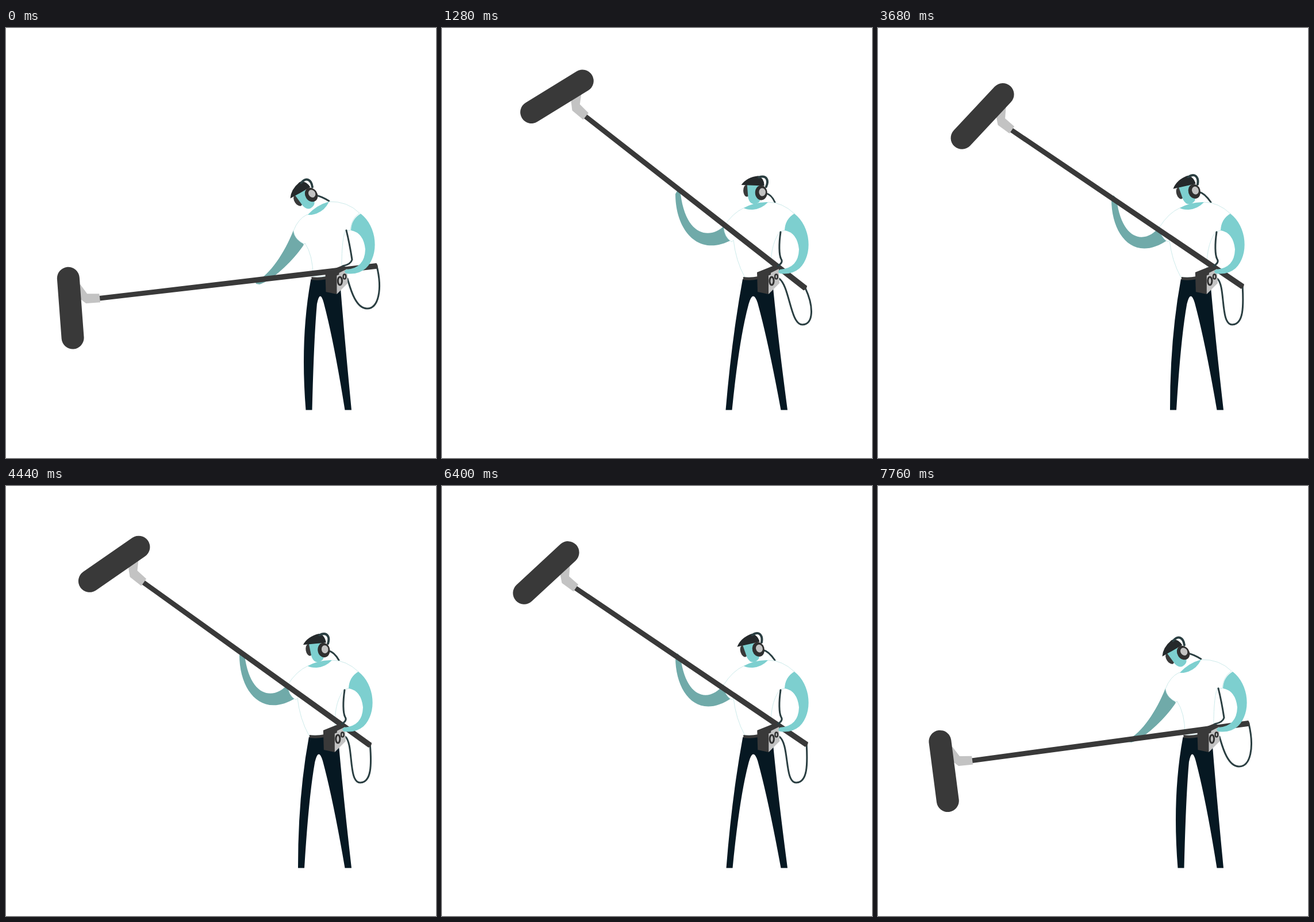
Recreate the animation shown at these times as an HTML page. Size 748 by 748 pixels, loop 7800 ms.

```html
<!DOCTYPE html>
<html lang="en">
<head>
<meta charset="utf-8">
<title>Boom operator</title>
<style>
  html, body { margin: 0; width: 100%; height: 100%; overflow: hidden; background: #fff; }
  svg { display: block; width: 100%; height: 100%; }
  .skin { fill: #7dcfcf; }
  .shade { fill: #70aaa9; }
  .dark { fill: #393939; }
  .grey { fill: #c3c3c3; }
  .wire { fill: none; stroke: #2b3f42; stroke-width: 3; stroke-linecap: round; stroke-linejoin: round; }
  #shirt { fill: #fff; stroke: #bfe5e5; stroke-width: .8; }
  #pants { fill: #061822; }
</style>
</head>
<body>
<svg viewBox="0 0 748 748">
  <path id="backArm" class="shade"/>
  <path id="headWire" class="wire"/>
  <g id="head">
    <ellipse class="dark" cx="-25" cy="-4.5" rx="6" ry="10.5"/>
    <path class="skin" d="M-24,-17 L-4,-17 L-2,12 Q-4,19 -14,19 Q-21,18 -23,8 Z"/>
    <path fill="#25292b" d="M-34,-15 Q-24,-28 -4,-29.5 Q6,-26 6,-12 Z"/>
    <path class="wire" style="stroke-width:4" d="M-3,-27 C10,-31 15,-22 9,-10"/>
    <ellipse fill="#303030" rx="10.5" ry="12.8"/>
    <ellipse class="grey" cx="2" cy="-1" rx="5.8" ry="7"/>
  </g>
  <path id="shirt"/>
  <path id="neck" class="skin" d="M525,313 Q545,302 567,303 Q556,315 540,316 Q529,316 525,313 Z"/>
  <path id="pants"/>
  <path id="belt" class="dark" d="M524,433 Q536,435 550,432 L550,437 Q538,440 524,438 Z"/>
  <path id="cable" class="wire"/>
  <g id="boom">
    <path class="dark" d="M-433,-4.3 L53,-4.9 Q56,0 53,4.9 L-433,4.3 Z"/>
    <path class="grey" d="M-432,-8 L-453,-10.5 L-463,-28 L-472,-22 L-468,-5 L-457,6 L-432,7 Z"/>
    <rect id="mic" class="dark" x="-38.2" y="-41.3" width="39" height="143" rx="19.5"/>
  </g>
  <g id="box">
    <path class="dark" d="M548,425 L578,413 L589,418 L569,428 L568,463 L549,459 Z"/>
    <path class="grey" d="M568,428 L586,419 L587,444 L568,463 Z"/>
    <g fill="none" stroke="#303030">
      <ellipse cx="573.5" cy="440" rx="3.6" ry="7" stroke-width="3"/>
      <ellipse cx="581.5" cy="432.5" rx="2.4" ry="4" stroke-width="2.4"/>
    </g>
    <path class="dark" d="M567,425 L572,423 L572,429 L567,431 Z"/>
  </g>
  <path id="cord" class="wire"/>
  <path id="arm" class="skin" d="M613,323 C642,345 646,395 622,418 Q608,430 588,427 Q582,424 588,420
    Q620,418 621,385 Q618,356 596,352 Q597,332 613,323 Z"/>
</svg>
<script>
const LOOP = 7800, STEP = 40;
const LEAD = 120; // the boom starts to rise this long before the loop point
const REST = -8.5, PEAK = 39.2; // boom angles, degrees

const set = (id, name, value) => document.getElementById(id).setAttribute(name, value);
const mix = (a, b, k) => a + (b - a) * k;
const clamp = (v, lo, hi) => Math.min(hi, Math.max(lo, v));
const part = (t, from, to) => clamp((t - from) / (to - from), 0, 1);
const smooth = u => u * u * (3 - 2 * u);
const ease = (t, from, to) => smooth(part(t, from, to));
const sin = deg => Math.sin(deg * Math.PI / 180);
const cos = deg => Math.cos(deg * Math.PI / 180);

// Steps of the moving foot: start, end, new x
const steps = [[240, 770, 499], [2370, 3020, 513.5], [5020, 5720, 500], [6570, 7220, 527]];

function foot(t) {
  let x = 527, lift = 0;
  for (const [from, to, next] of steps) {
    x = mix(x, next, ease(t, from, to));
    lift += 5 * sin(180 * part(t, from, to));
  }
  return { x, y: 664.5 - lift };
}

function pose(t) {
  const rise = part(t, 0, 1020);
  const up = smooth(rise) - smooth(part(t, 6520, LOOP) ** 1.8);
  const bend = 1 - ease(t, 120, 970) + ease(t, 6520, 7670);
  const settle = ease(t, 1020, 1820);
  const sway = (1 - cos(360 * clamp(t - 2420, 0, 4050) / 2700)) / 2;
  return {
    bend, settle,
    tilt: mix(REST, PEAK - 2.6 * settle - 2.5 * sway, up),
    turn: mix(88.5, 108.3 + .0015 * t - 15 * sway, up) + 24 * sin(180 * rise) ** 2,
    nod: mix(-5 * settle - 12 * sway, -34, bend)
  };
}

// Upright and stooped outlines share one command order
const shapes = {
  shirt: [
    'M525,313 Q505,322 490,346 Q491,364 504,372 L507,369 Q511,405 527,434 L573,434 Q568,380 588,354 L597,352 Q598,332 613,323 Q592,303 567,303 Q552,317 533,315 Z',
    'M523,325 Q508,332 500,353 Q502,368 519,376 L520,374 Q534,395 534,432 L584,432 Q583,372 590,352 L599,352 Q600,332 615,322 Q594,301 562,302 Q548,320 530,324 Z'],
  cord: [
    'M589,355 C586,375 586,395 590,402 Q594,408 584,414',
    'M592,352 C597,372 600,390 602,403 Q600,411 586,414'],
  backArm: [
    'M490,345 C468,365 425,365 415,288 L410,281 L406,288 C406,350 445,400 505,368 Z',
    'M500,352 C484,392 460,428 434,442 L435,445 L441,446 C462,440 500,405 518,377 Z']
};
const number = /-?\d+(\.\d+)?/g;

function blend([up, down], k, shift = () => 0) {
  const ends = down.match(number);
  let i = 0;
  return up.replace(number, v => {
    const value = mix(+v, +ends[i], k) + shift(i);
    i++;
    return value.toFixed(2);
  });
}

function drawBody(k, tilt) {
  // The far hand follows the height of the pole
  const pole = 420 - mix(228, 158, k) * sin(tilt);
  const drop = .75 * (1 - k) * (pole - mix(278.7, 437.3, k));
  const follow = i => i > 1 && i < 16 && i % 2 ? drop : 0;
  for (const id in shapes) set(id, 'd', blend(shapes[id], k, id === 'backArm' ? follow : undefined));
  set('neck', 'transform', `translate(${-5 * k} ${-k}) rotate(${-18 * k} 567 303)`);
  set('arm', 'transform', `translate(${4 * k} 0)`);
}

function drawHead(k, nod) {
  const x = 556 + nod / 3 - 13.6 * k, y = 287 + nod / 6 + 8.7 * k;
  set('head', 'transform', `translate(${x} ${y}) rotate(${nod})`);
  set('headWire', 'd', `M${x + 8},${y + 1} Q${x + 18},${y + 3} ${579 - 17 * k},${303 - 2 * k}`);
}

function drawLegs(h, { x, y }) {
  set('pants', 'd', `M${523 + h},437 Q${504 + h},540 ${x - 5.5},${y} L${x + 5.5},${y}
    Q${517 + h * 2.5},540 ${533.5 + h},480 Q${541 + h * .7},454 ${549 + h * .5},478
    Q${567.5 + h * .4},545 589.5,664.5 L601,664.5 Q${584.5 + h * .6},540 ${576 + h * .8},452 L${568 + h},437 Z`);
}

function drawCable(k, h, settle, end) {
  const x = mix(616 + 20 * (1 - settle), 628, k), y = 516 - 28 * k;
  set('cable', 'd', `M${586.5 + h},436 C${605 - 7 * k},449 ${x - 21},${y} ${x},${y}
    C${x + 20},${y} ${x + 20 + 7 * k},${484 - 29 * k} ${end}`);
}

function draw(t) {
  const { bend, settle, tilt, turn, nod } = pose(t);
  const step = foot(t), h = (step.x - 499) * .265;
  const px = 590.3 + 2 * bend, py = 420;

  drawBody(bend, tilt);
  drawHead(bend, nod);
  drawLegs(h, step);
  drawCable(bend, h, settle, [px + 53 * cos(tilt), py + 53 * sin(tilt)]);
  set('belt', 'transform', `translate(${h} 0)`);
  set('box', 'transform', `translate(${h} 0)`);
  set('boom', 'transform', `translate(${px} ${py}) rotate(${tilt})`);
  set('mic', 'transform', `translate(-464.7 -18.5) rotate(${turn - 90})`);
}

const start = performance.now();
function tick() {
  const t = Math.floor((performance.now() - start) / STEP) * STEP;
  draw((t + LEAD) % LOOP);
  requestAnimationFrame(tick);
}
tick();
</script>
</body>
</html>
```
